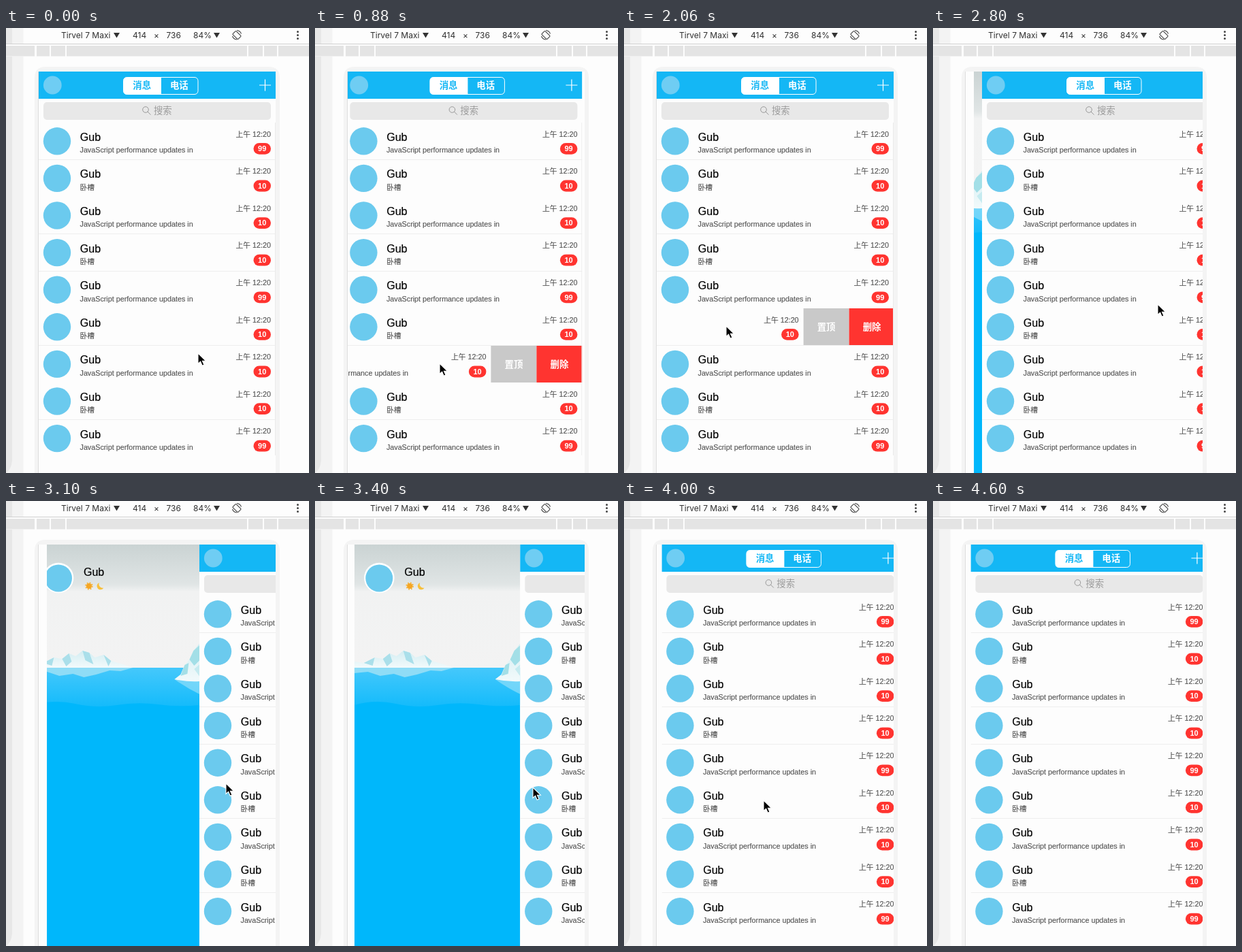
Write an HTML page that moves like this. It is 445x654 px and loops after 5.35 s.

```html
<!DOCTYPE html>
<html lang="zh-CN">
<head>
<meta charset="utf-8">
<title>Swipe list</title>
<style>
html, body { margin: 0; width: 100%; height: 100%; overflow: hidden; background: #fdfdfd; }
svg { display: block; width: 445px; height: 654px; }
text { font-family: "Liberation Sans", "Noto Sans CJK SC", "Noto Sans CJK", sans-serif; }
.bar { font: 12px Inter, sans-serif; fill: #303030; }
.name { font-size: 16px; fill: #000; stroke: #000; stroke-width: .2px; }
.small { font-size: 10.75px; fill: #555; stroke: #555; stroke-width: .15px; }
.label { font-size: 13.4px; font-weight: bold; text-anchor: middle; }
.hint { font-weight: 500; fill: #9b9b9b; }
.badge { font-size: 11px; font-weight: bold; fill: #fff; text-anchor: middle; }
.end { text-anchor: end; }
</style>
</head>
<body>
<svg viewBox="0 0 445 654">
  <defs>
    <clipPath id="screen"><rect x="48" y="64" width="348" height="590"/></clipPath>
    <clipPath id="panelClip"><rect y="64" width="243.6" height="590"/></clipPath>
    <linearGradient id="sky" x1="0" y1="0" x2="0" y2="1">
      <stop offset="0" stop-color="#cad3d3"/><stop offset=".32" stop-color="#e0e5e5"/>
      <stop offset=".38" stop-color="#f1f2f2"/><stop offset="1" stop-color="#f3f3f3"/>
    </linearGradient>
    <linearGradient id="shallow" x1="0" y1="0" x2="0" y2="1">
      <stop offset="0" stop-color="#45c8fb"/><stop offset="1" stop-color="#14bbfb"/>
    </linearGradient>
    <linearGradient id="ice" x1="0" y1="0" x2="0" y2="1">
      <stop offset="0" stop-color="#d3edf2"/><stop offset="1" stop-color="#f2fafb"/>
    </linearGradient>
  </defs>

  <rect width="445" height="654" fill="#fdfdfd"/>
  <rect width="25.5" height="654" fill="#f3f3f3"/>
  <path d="M0 0H9V636Q8 648 0 654Z" fill="#e7e7e7"/>
  <path d="M0 23.5H445" stroke="#cfcfcf"/>
  <rect y="24" width="445" height="18" fill="#fdfdfd"/>
  <g id="ruler" fill="#e4e4e4"></g>

  <text class="bar" x="81" y="15">Tirvel 7 Maxi</text>
  <text class="bar" x="186" y="15">414</text>
  <text class="bar" x="217" y="15">×</text>
  <text class="bar" x="235.5" y="15">736</text>
  <text class="bar" x="275" y="15">84%</text>
  <path d="M158 7h9l-4.500 7.500ZM305 7h9l-4.500 7.500Z" fill="#333"/>
  <g fill="none" stroke="#444" stroke-width="1.1">
    <rect x="335.500" y="5" width="7" height="11" rx="1" transform="rotate(-45 339 10.500)"/>
    <path d="M339 3.500Q344 4 345.500 8.500M339 17Q334 16.500 332.500 12"/>
  </g>
  <g fill="#444"><circle cx="428.500" cy="5.500" r="1.500"/><circle cx="428.500" cy="10.500" r="1.500"/><circle cx="428.500" cy="15.500" r="1.500"/></g>

  <path d="M42 654V73Q42 57 58 57H386Q402 57 402 73V654Z" fill="#f4f4f4"/>
  <rect x="48" y="64" width="348" height="590" fill="#fdfdfd"/>
  <path d="M47.500 64V654" stroke="#dedede"/>

  <g clip-path="url(#screen)">
    <!-- The page clips its own overflow, and that clip moves with it. -->
    <g id="root" clip-path="url(#screen)">
      <g id="panel" clip-path="url(#panelClip)">
        <rect y="64" width="244" height="182" fill="url(#sky)"/>
        <rect y="245" width="244" height="409" fill="#00b7fb"/>
        <path d="M0 245H244V300Q214 303 183 299T122 300T61 298T0 300Z" fill="url(#shallow)"/>
        <path d="M0 245H146L128 250L112 249L92 255L74 259L58 254L38 257L20 251L0 253Z" fill="#8fdcf6"/>
        <path d="M0 236L14 238L30 230L42 232L52 224L62 228L72 220L82 223L90 230L103 226L114 235L128 239L146 245H0Z" fill="url(#ice)"/>
        <path d="M42 232L52 224L56 236L48 243ZM72 220L82 223L88 240L76 234ZM103 226L114 235L110 243ZM14 238L30 230L27 242Z" fill="#aadfea"/>
        <path d="M207 262H244V284Q225 275 207 262Z" fill="#8fdff9" opacity=".7"/>
        <path d="M207 262L216 255L222 241L229 233L235 220L244 209V265Q225 266 207 262Z" fill="url(#ice)"/>
        <path d="M229 233L235 220L244 212V234L236 242ZM222 241L228 238L226 254L216 257Z" fill="#a3dfe7"/>
        <path d="M236 247L244 240V258Z" fill="#c6ebf0"/>
        <circle cx="36.600" cy="113" r="22.300" fill="#fff"/>
        <circle cx="36.600" cy="113.500" r="20" fill="#6bcaee"/>
        <text class="name" x="73.600" y="110">Gub</text>
        <g transform="translate(81.500 125)">
          <circle r="4.800" fill="none" stroke="#f6b63e" stroke-width="2" stroke-dasharray="1.900 1.870"/>
          <circle r="4" fill="#f5a623"/>
        </g>
        <path d="M96.500 120A5.300 5.300 0 1 0 103 127.500A5.500 5.500 0 0 1 96.500 120Z" fill="#f7c03c"/>
      </g>

      <g id="main">
        <rect x="48" y="64" width="348" height="590" fill="#fdfdfd"/>
        <rect x="48" y="64" width="348" height="40" fill="#14b7f5"/>
        <circle cx="68.300" cy="84" r="13.400" fill="#6fcdf3"/>
        <rect x="172.500" y="72.500" width="109.500" height="25" rx="5" fill="none" stroke="#fff"/>
        <path d="M228 72.500H177.500Q172.500 72.500 172.500 77.500V92.500Q172.500 97.500 177.500 97.500H228Z" fill="#fff"/>
        <text class="label" x="199.700" y="89" fill="#14b7f5">消息</text>
        <text class="label" x="254.300" y="89" fill="#fff">电话</text>
        <path d="M372 84H389M380.500 75.500V92.500" stroke="#fff" stroke-width="1.200"/>
        <rect x="55" y="109" width="334" height="26" rx="5" fill="#e8e8e8"/>
        <g fill="none" stroke="#999"><circle cx="205" cy="120" r="4.300"/><path d="M208 123L212.500 127.500"/></g>
        <text class="label hint" x="230.300" y="126.300">搜索</text>
        <g id="rows"></g>
        <path d="M395.500 139V628" stroke="#ebebeb"/>
      </g>
    </g>
  </g>
  <path id="cursor" d="M0 0V15.500L3.600 12.200L6.200 18.200L9 17L6.400 11.200H11.300Z" fill="#000" stroke="#fff" stroke-width="1.100"/>
</svg>
<script>
const $ = id => document.getElementById(id);
const PITCH = 54.6, TOP = 139, LOOP = 5350, LAST = 31, DRAWER = 243.6;

const marks = [0, 44, 65, 88, 355, 378, 399, 446];
$('ruler').innerHTML = marks.slice(1).map((x, i) =>
  `<rect x="${marks[i] + (i ? 1 : 0)}" y="26" width="${x - marks[i] - 2}" height="15.5"/>`).join('');

function row(i) {
  const y = i * PITCH;
  const note = i % 2 ? '卧槽' : 'JavaScript performance updates in';
  return `<g id="row${i}"><g transform="translate(0 ${y.toFixed(1)})">
    <circle cx="75" cy="166.3" r="20.2" fill="#6bcaee"/>
    <text class="name" x="108.8" y="165.8">Gub</text>
    <text class="small" x="108.5" y="183.2">${note}</text>
    <text class="small end" x="389" y="159.7">上午 12:20</text>
    <rect x="363.5" y="169" width="25.5" height="16.8" rx="8.4" fill="#ff3430"/>
    <text class="badge" x="376.2" y="181.3">${i % 4 ? 10 : 99}</text></g></g>`;
}

function actions(i) {
  const y = Math.round(TOP + i * PITCH);
  return `<g id="act${i}">
    <rect x="396" y="${y}" width="67" height="54" fill="#c9c9c9"/>
    <rect x="463" y="${y}" width="67" height="54" fill="#ff3430"/>
    <g fill="#fff"><text class="label" x="429.5" y="${y + 31.5}">置顶</text>
    <text class="label" x="496.5" y="${y + 31.5}">删除</text></g></g>`;
}

const lines = [193.5, 302.5, 357.5, 466.5, 575.5];
$('rows').innerHTML = Array.from({ length: 9 }, (_, i) => row(i)).join('') +
  lines.map(y => `<path d="M48 ${y}H396" stroke="#eeeeee"/>`).join('') +
  actions(5) + actions(6);

// Each track is a list of [step, value] points.
const tracks = {
  root: [[2, 0], [4, -3.6], [8, -3.6], [10, 0], [14, 0], [16, 4], [18, 12], [22, 12], [24, 7.4]],
  main: [[18, 0], [19, 12], [20, 122], [21, 224], [22, DRAWER], [23, DRAWER], [24, 200], [25, 76.8], [26, 15], [27, 0]],
  lower: [[1, 0], [3, -62], [5, -134], [8, -134], [10, 0]],
  upper: [[10, 0], [13, -122], [14, -132.4], [15, -120], [17, 0]],
  x: [[1, 282], [5, 183], [7, 183], [10, 285], [11, 278], [14, 150], [15, 165], [18, 320], [19, 330], [21, 323], [23, 320], [25, 231], [27, 205], [30, 260]],
  y: [[0, 478], [6, 493], [7, 493], [10, 440], [14, 438], [19, 406], [21, 415], [25, 427], [27, 440], [30, 675]]
};

function at(points, k) {
  const n = points.findIndex(p => p[0] >= k);
  if (n < 0) return points[points.length - 1][1];
  if (n === 0) return points[0][1];
  const [a, va] = points[n - 1], [b, vb] = points[n];
  return va + (vb - va) * (k - a) / (b - a);
}

// Steps last 150 ms, a few of them 140 ms.
const short = [4, 6, 11, 14, 19];
const start = k => 150 * k - 10 * short.filter(n => k >= n).length;
function stepAt(t) {
  let k = LAST;
  while (k > 0 && start(k) > t + 0.5) k--;
  return k;
}

const move = (id, x, y = 0) => $(id).setAttribute('transform', `translate(${x.toFixed(2)} ${y.toFixed(2)})`);

function draw(t) {
  const k = stepAt(t);
  const v = name => at(tracks[name], k);
  const main = v('main');
  move('root', v('root'));
  move('main', main);
  move('panel', 48 + main - DRAWER);
  [[5, v('upper')], [6, v('lower')]].forEach(([i, dx]) => {
    move('row' + i, dx);
    move('act' + i, dx);
  });
  move('cursor', v('x'), v('y'));
}

const t0 = performance.now();
function tick(now) {
  draw(Math.max(0, now - t0) % LOOP);
  requestAnimationFrame(tick);
}
draw(0);
requestAnimationFrame(tick);
</script>
</body>
</html>
```
